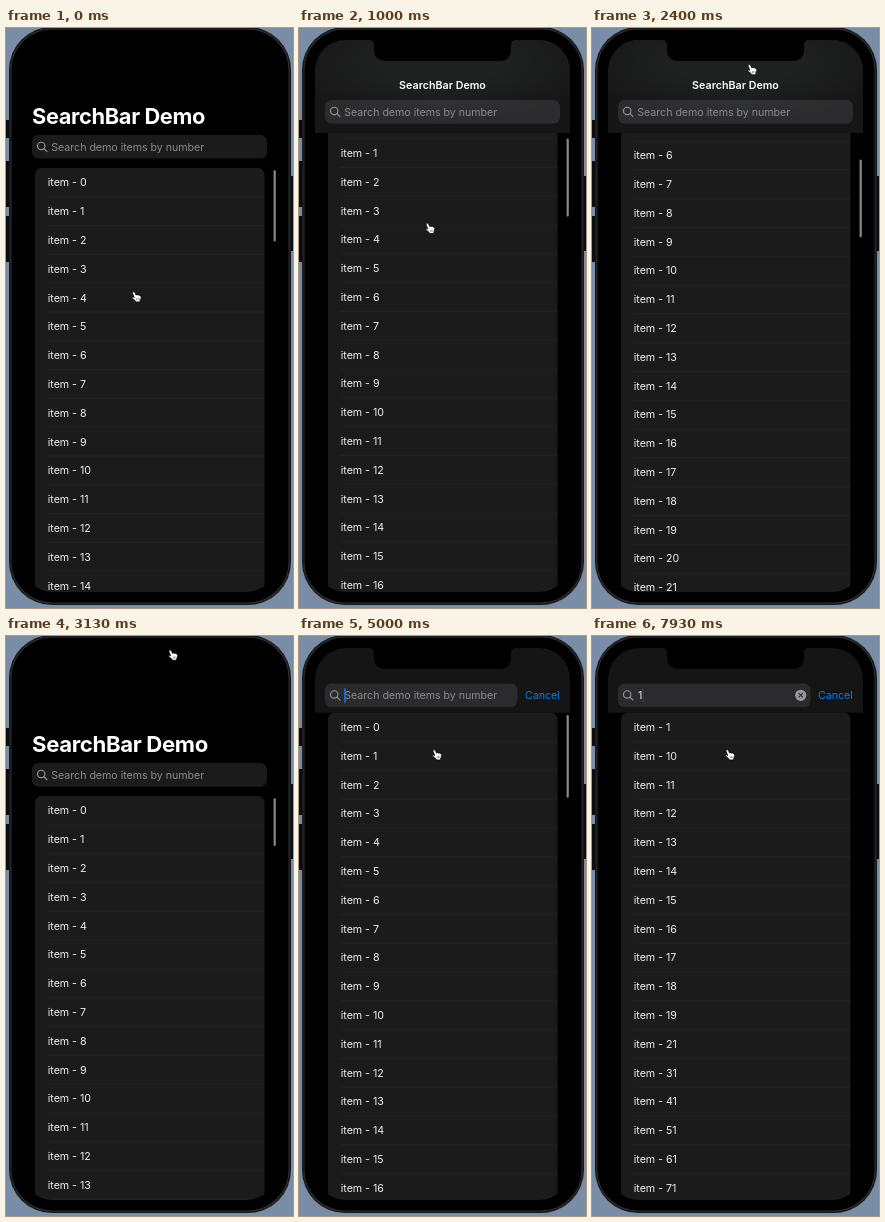
These frames come from a looping animation (287x580 px, 8 s). An HTML page:

```html
<!DOCTYPE html>
<html lang="en">
<head>
<meta charset="utf-8">
<title>SearchBar Demo</title>
<style>
  html, body { margin: 0; width: 100%; height: 100%; overflow: hidden; background: #7a8da7; }
  svg { display: block; width: 100vw; height: 100vh; }
  text { font: 400 10.65px Inter, Roboto, sans-serif; letter-spacing: -.03px; fill: #f0f0f0; }
  #large { font-size: 21.8px; font-weight: 700; letter-spacing: -.35px; fill: #fff; }
  #small { font-weight: 600; letter-spacing: .04px; fill: #fff; text-anchor: middle; }
  #hint { fill: #8b8b90; }
  #cancel { fill: #0a7bf0; }
  .sep { stroke: #272728; stroke-width: .6; }
  .lens { fill: none; stroke: #98989c; stroke-width: 1.1; stroke-linecap: round; }
</style>
</head>
<body>
<svg viewBox="0 0 287 580" preserveAspectRatio="none">
  <defs>
    <clipPath id="screen"><rect x="16" y="12" width="255" height="552" rx="31"/></clipPath>
    <clipPath id="below"><rect x="16" y="72" width="255" height="492"/></clipPath>
    <radialGradient id="shade" cx=".5" cy=".25" r=".62">
      <stop offset=".35" stop-color="#202121"/>
      <stop offset="1" stop-color="#161617"/>
    </radialGradient>
  </defs>

  <rect width="287" height="580" fill="#7a8da7"/>
  <g fill="#0c0d10">
    <rect x="-2" y="92" width="6" height="18" rx="1"/>
    <rect x="-2" y="133" width="6" height="46" rx="1"/>
    <rect x="-2" y="188" width="6" height="46" rx="1"/>
    <rect x="284" y="148" width="6" height="75" rx="1"/>
  </g>
  <rect x="3" y="-1" width="282" height="578" rx="43" fill="#17181a"/>
  <rect x="5" y="1" width="278" height="574" rx="41" stroke="#2d2d2f" stroke-width="1.1"/>

  <g clip-path="url(#screen)">
    <g id="list"><rect x="29" width="229.5" height="2880" rx="6.5" fill="#1b1b1c"/></g>
    <g clip-path="url(#below)"><g id="big"><text id="large">SearchBar Demo</text></g></g>
    <rect id="bar" x="16" y="12" width="255" fill="#151516"/>
    <rect id="tint" x="16" y="12" width="255" fill="url(#shade)"/>
    <text id="small" x="143.5" y="60.8">SearchBar Demo</text>
    <g id="search">
      <rect id="field" x="26" y="-11.8" height="23.6" rx="6.5" fill="rgba(118,118,123,.23)"/>
      <circle class="lens" cx="35.2" cy="-.9" r="3.7"/>
      <path class="lens" d="M38 1.9 41 4.9"/>
      <text id="hint" x="45.3" y="3.9">Search demo items by number</text>
      <text id="query" x="46" y="3.9">1</text>
      <rect id="caret" y="-7" width="1.5" height="14.4" rx=".7" fill="#0a7bf0"/>
      <g id="clear">
        <circle cx="208.7" r="5.6" fill="#97979d"/>
        <path d="M206.6-2.1l4.2 4.2m0-4.2l-4.2 4.2" stroke="#262628" stroke-width="1.1"/>
      </g>
      <text id="cancel" y="3.9">Cancel</text>
    </g>
    <rect id="thumb" x="267.6" width="2.2" rx="1.1" fill="#89898b"/>
  </g>
  <path d="M70 11v1q5 0 5 5v4q0 12 12 12h113q12 0 12-12v-4q0-5 5-5v-1z"/>

  <g id="hand">
    <path d="M1.2 1.3C2.2.3 3.2.9 3.6 1.9L4.5 4.1C5.2 3.4 6.2 3.6 6.5 4.2 7.2 3.7 8.1 4 8.3 4.7 9.3 4.6 9.6 5.4 9.6 6.3 9.6 8 9 8.8 8.6 9.5L8.5 10.9H4.3L3.9 9.8 1 7.4C.2 6.6 1 5.7 1.9 6.1L2.8 6.6 1.1 2.6Q.8 1.8 1.2 1.3Z" fill="#fff" stroke="#000" stroke-width=".7"/>
    <path d="M5.2 7.2v2M6.6 7.2v2M8 7.2v2" stroke="#333" stroke-width=".5"/>
  </g>
</svg>

<script>
const LOOP = 8000, TICK = LOOP / 120, ROW = 28.8, ROWS = 24, FOLD = 34.2, BOTTOM = 564;
const FOCUS = 4230, CARET = 4600, TYPE = 6060;
const NS = 'http://www.w3.org/2000/svg';
const $ = id => document.getElementById(id);
const mix = (a, b, k) => a + (b - a) * k;
const ramp = (v, from, to) => Math.min(1, Math.max(0, (v - from) / (to - from)));
const ease = (t, from, to) => { const k = ramp(t, from, to); return k * k * (3 - 2 * k); };
const set = (id, attrs) => { for (const k in attrs) $(id).setAttribute(k, attrs[k]); };
const move = (id, x, y, more = '') => set(id, { transform: `translate(${x} ${y})${more}` });

function add(name, attrs) {
  const el = document.createElementNS(NS, name);
  for (const k in attrs) el.setAttribute(k, attrs[k]);
  return $('list').appendChild(el);
}

// Settle, drag up, jump back to the top with a bounce
const scroll = t => -.8 * (1 - ramp(t, 0, 200))
  + 199 * ease(t, 280, 2310)
  - 224 * ease(t, 2830, 3160)
  + 25 * ease(t, 3160, 3670);

const strokes = [
  { from: 370, to: 1050, dx: .7, dy: -69.5 },
  { from: 1130, to: 1800, dx: .8, dy: -64.5 },
  { from: 2070, to: 2530, dx: 35, dy: -115.7 },
  { from: 3150, to: 3700, dx: -18, dy: 78 },
  { from: 3700, to: 4130, dx: -11, dy: 21.7 }
];
const hand = t => strokes.reduce(([x, y], { from, to, dx, dy }) => {
  const k = ease(t, from, to);
  return [x + dx * k, y + dy * k];
}, [125.5, 263]);

function blink(t) {
  if (t < CARET) return 0;
  const p = (t - (t < TYPE ? CARET : TYPE)) % 1000;
  return 1 - ramp(p, 460, 600) + ramp(p, 830, 1000);
}

const all = Array.from({ length: 100 }, (_, i) => String(i));
const has = all.filter(n => n.includes('1'));
const matches = [...has.filter(n => n[0] === '1'), ...has.filter(n => n[0] !== '1')];

const labels = [];
for (let i = 0; i < ROWS; i++) {
  labels.push(add('text', { x: 41.8, y: i * ROW + 18.3 }));
  add('path', { class: 'sep', d: `M41.5 ${(i + 1) * ROW}H258.5` });
}

let shown;
function fill(items) {
  if (items === shown) return;
  shown = items;
  labels.forEach((el, i) => { el.textContent = i < items.length ? 'item - ' + items[i] : ''; });
}

function draw(t) {
  const s = scroll(t);
  const active = ease(t, FOCUS, FOCUS + 500);
  const typed = t >= TYPE;
  const folded = Math.min(s, FOLD);
  const over = Math.max(0, -s);
  const navEnd = mix(139.2 - folded, 76.8, active);
  const height = navEnd - 12;

  fill(typed ? matches : all);
  move('list', 0, mix(139.2 - s, 76.8, active));
  move('big', 26, mix(95 - s, 55, active), ` scale(${1 + over * .0008})`);
  set('big', { opacity: 1 - ramp(active, 0, .6) });
  set('bar', { height, opacity: Math.max(ramp(s, 26, 35), active) });
  set('tint', { height, opacity: ramp(s, 34, 49) });
  set('small', { opacity: ramp(s, 20, 34) });

  move('search', 0, mix(118 - folded, 59.3, active));
  set('field', { width: mix(235, 192.5, active) });
  set('hint', { opacity: +!typed });
  set('query', { opacity: +typed });
  set('clear', { opacity: +typed });
  set('caret', { x: typed ? 50.4 : 45.2, opacity: blink(t) });
  set('cancel', { x: mix(268, 226, active), opacity: active });

  set('thumb', {
    y: navEnd + 2.2 + Math.max(0, s - FOLD) * .147,
    height: Math.max(10, (BOTTOM - navEnd) * .17 - over),
    opacity: 1 - ramp(t, 5530, 5800)
  });
  move('hand', ...hand(t));
}

const start = performance.now();
function frame() {
  const t = (performance.now() - start) % LOOP;
  draw(Math.floor((t + 4) / TICK) * TICK % LOOP);
  requestAnimationFrame(frame);
}
frame();
</script>
</body>
</html>
```
